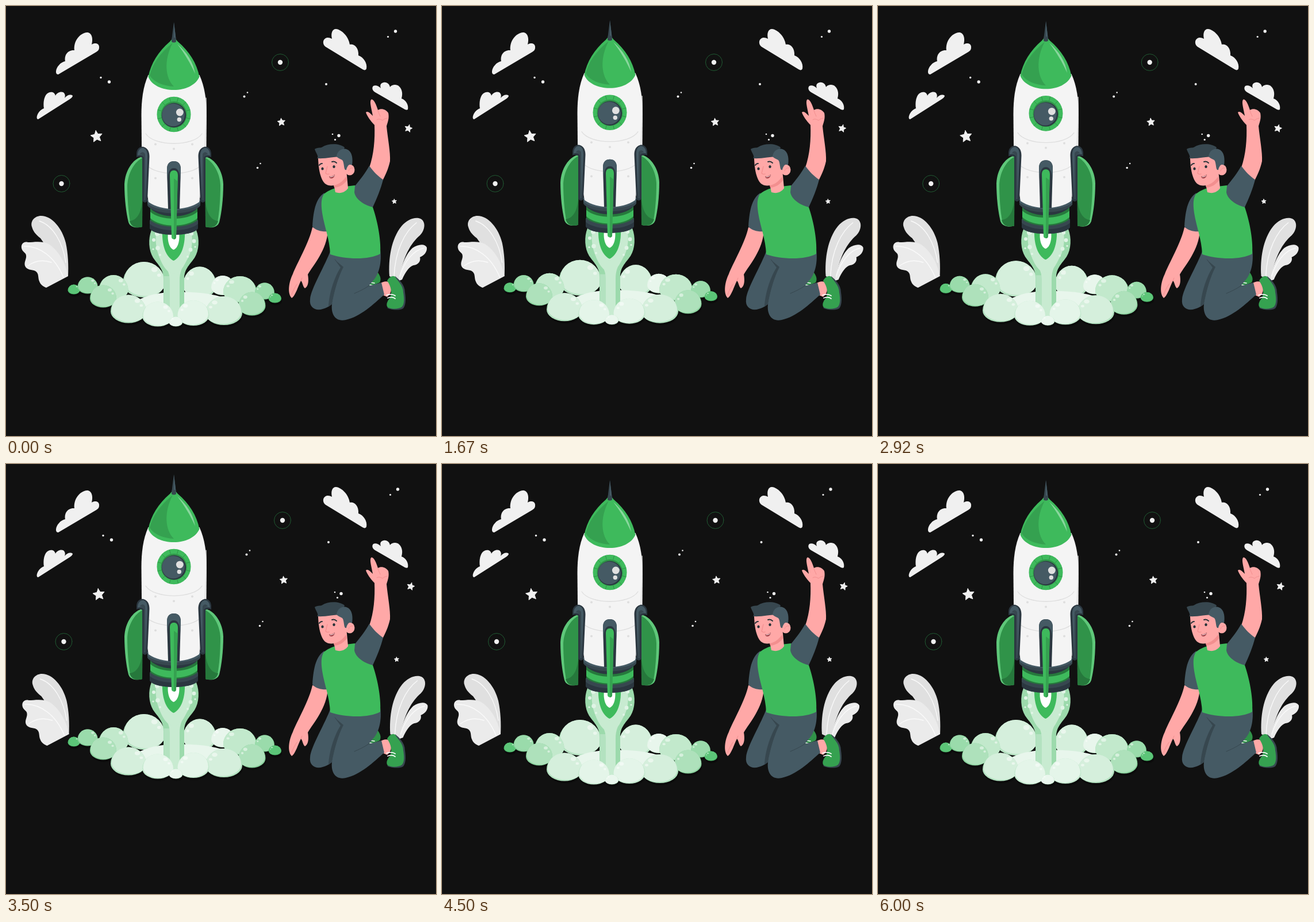
An HTML page with a canvas that plays this animation: 748x748 px, repeating every 6.04 s.

```html
<!DOCTYPE html>
<html lang="en">
<head>
<meta charset="utf-8">
<title>Rocket launch</title>
<style>
html, body { margin: 0; width: 100%; height: 100%; overflow: hidden; background: #111; }
canvas { display: block; width: 100vw; height: 100vh; }
</style>
</head>
<body>
<canvas id="stage" width="748" height="748"></canvas>
<script>
const ctx = document.getElementById('stage').getContext('2d');
const LOOP = 6040, FRAME = 1000 / 24, UNIT = 748 / 500;
const GREEN = '#3eba5c', MID = '#35a150', DEEP = '#309349', DARK = '#26783c';
const SLATE = '#455a64', NAVY = '#37474f', INK = '#2b3740';
const SKIN = '#ffa8a7', BLUSH = '#f28f8f', WHITE = '#f0f0f0';

function fill(color, d) {
  ctx.fillStyle = color;
  ctx.fill(new Path2D(d));
}

function line(color, width, d) {
  ctx.strokeStyle = color;
  ctx.lineWidth = width;
  ctx.lineCap = ctx.lineJoin = 'round';
  ctx.stroke(new Path2D(d));
}

function oval(color, x, y, rx, ry = rx) {
  ctx.fillStyle = color;
  ctx.beginPath();
  ctx.ellipse(x, y, rx, ry, 0, 0, Math.PI * 2);
  ctx.fill();
}

function group(dx, dy, draw) {
  ctx.save();
  ctx.translate(dx, dy);
  draw();
  ctx.restore();
}

// Draws the same part on both sides of the rocket axis.
function both(draw) {
  draw();
  ctx.save();
  ctx.translate(584, 0);
  ctx.scale(-1, 1);
  draw();
  ctx.restore();
}

function skyClouds() {
  fill(WHITE, 'M91,119C85,120 86,109 92,103C95,99 99,97 103,96C101,86 107,76 119,77C117,62 128,47 141,46C149,46 152,56 149,67C155,63 163,65 162,73C162,76 160,78 157,80Z');
  fill(WHITE, 'M56,197C51,197 54,183 66,178C64,164 68,151 77,150C82,149 85,152 86,156C89,149 100,147 102,153C103,155 103,157 102,160C106,155 112,153 116,156C116,158 114,160 111,162Z');
  fill(WHITE, 'M556,71C551,68 550,59 556,56C559,54 563,55 567,57C565,48 567,40 574,40C584,41 596,53 598,67C605,65 614,72 613,86C622,89 629,100 627,109C626,112 623,112 620,110Z');
  fill(WHITE, 'M642,150C637,147 636,142 639,139C643,137 648,139 652,143C650,137 652,134 657,133C663,132 667,136 668,141C671,137 679,135 684,140C690,146 690,154 688,161C695,163 701,172 699,180C698,181 696,181 694,180Z');
}

function star(x, y, r, tilt) {
  ctx.beginPath();
  for (let i = 0; i < 10; i++) {
    const a = (tilt + i * 36) * Math.PI / 180, q = i % 2 ? r * 0.48 : r;
    ctx.lineTo(x + q * Math.cos(a), y + q * Math.sin(a));
  }
  ctx.closePath();
  ctx.fillStyle = ctx.strokeStyle = WHITE;
  ctx.lineWidth = 1;
  ctx.lineJoin = 'round';
  ctx.fill();
  ctx.stroke();
}

function stars() {
  const dots = [
    [165, 124.5, 1.7], [179.5, 132, 2.7], [677.5, 44, 2.7], [664.5, 53.5, 1.6],
    [557, 136, 2], [414.5, 157.5, 2], [420, 150.5, 1.3], [437.5, 281.5, 1.8],
    [442.5, 274, 1.3], [568, 223, 1.3], [572.5, 232.5, 1.6], [579, 225.5, 2.7]
  ];
  for (const [x, y, r] of dots) oval(WHITE, x, y, r);
  for (const [x, y] of [[477, 98], [96.5, 309]]) {
    oval(WHITE, x, y, 4.2);
    ctx.strokeStyle = '#205a32';
    ctx.lineWidth = 1;
    ctx.beginPath();
    ctx.arc(x, y, 14.5, 0, Math.PI * 2);
    ctx.stroke();
  }
  star(157.5, 227, 10.6, -98);
  star(479, 202, 7, -96);
  star(700, 213, 6.8, -76);
  star(675.5, 340, 4.2, -96);
}

function plants() {
  fill('#e0e0e0', 'M45,384C42,374 50,365 61,365C80,365 98,387 104,412C108,430 109,452 108,470L95,470C85,448 72,420 60,404C50,396 47,391 45,384Z');
  line('#fafafa', 1.4, 'M58,374C82,382 99,412 104,446');
  fill('#ebebeb', 'M38,411C30,409 26,415 27,421C28,428 35,429 35,434C36,440 31,445 33,452C36,460 45,458 51,461C58,465 55,473 58,479C60,485 65,488 70,490L108,470C104,446 90,424 74,414C63,408 48,411 38,411Z');
  line('#fafafa', 1.4, 'M31,418C58,417 85,436 100,472M38,452C50,443 64,441 79,446');
  fill('#e0e0e0', 'M667,470C665,440 670,405 688,383C698,371 712,366 721,370C731,375 729,390 720,399C705,412 690,435 684,478Z');
  line('#fafafa', 1.4, 'M714,377C694,392 677,425 675,470');
  fill('#ebebeb', 'M683,478C686,455 695,432 707,421C717,414 729,413 732,420C733,428 727,434 720,437C722,444 717,450 709,451C702,453 695,462 689,476Z');
  line('#fafafa', 1.4, 'M727,421C708,425 693,445 685,470');
}

// A dome: tall above its widest line, flatter below.
function dome(x, y, rx, ry) {
  const mid = y + ry * 0.18;
  ctx.beginPath();
  ctx.ellipse(x, mid, rx, ry * 1.18, 0, Math.PI, Math.PI * 2);
  ctx.ellipse(x, mid, rx, ry * 0.82, 0, 0, Math.PI);
  ctx.closePath();
}

// A shaded smoke ball lit from the side of the jet.
function puff([x, y, rx, ry, light, dark]) {
  const side = x < 292 ? 1 : -1;
  ctx.save();
  dome(x, y, rx, ry);
  ctx.fillStyle = dark;
  ctx.fill();
  ctx.clip();
  dome(x + side * rx * 0.06, y - ry * 0.08, rx, ry);
  ctx.fillStyle = light;
  ctx.fill();
  ctx.globalAlpha = 0.5;
  oval('#fff', x + side * rx * 0.5, y - ry * 0.57, rx * 0.15, ry * 0.14);
  oval('#fff', x + side * rx * 0.72, y - ry * 0.25, rx * 0.09, ry * 0.09);
  ctx.restore();
}

const backPuffs = [
  [240, 476, 36.5, 31, '#d5efdc', '#b7e3c3'], [337, 481, 29, 27.5, '#d5efdc', '#b7e3c3'],
  [118, 493, 10.5, 8.5, '#5cc578', '#43b062'], [142, 486, 17.5, 14.5, '#9adbab', '#7bcb91'],
  [187, 490, 25.5, 22, '#c2e9cc', '#9fdcaf'], [169, 505, 23, 19.5, '#aee1bb', '#8ad29d'],
  [377, 486, 20, 17, '#e8f6ec', '#cdebd5'], [407, 493, 29, 23, '#c2e9cc', '#9fdcaf'],
  [450, 496, 17, 14.5, '#9adbab', '#7bcb91'], [468, 508, 11, 8.5, '#5cc578', '#43b062'],
  [428, 518, 23.5, 20.5, '#aee1bb', '#8ad29d']
];
const frontPuffs = [
  [213, 527, 31, 24.5, '#d5efdc', '#b2e1bf'], [379, 530, 32, 25, '#d5efdc', '#b2e1bf'],
  [264, 536, 27, 21.5, '#e4f5e9', '#c5e9cf'], [326, 534, 27.5, 22, '#e4f5e9', '#c5e9cf'],
  [295.5, 549, 11.5, 8.5, '#eaf7ee', '#c5e9cf']
];

function exhaust() {
  for (const [x, y, rx, ry] of backPuffs.concat(frontPuffs)) {
    dome(x + 1, y + 4, rx, ry);
    ctx.fillStyle = '#0b0b0b';
    ctx.fill();
  }
  backPuffs.forEach(puff);
  fill('#e8f6ec', 'M226,514C245,502 268,498 292,498C326,496 366,500 398,514L392,540H232Z');
  fill('#9cdaac', 'M253,390C247,405 248,425 256,438C266,452 274,458 274,475V546H310V475C310,458 318,452 328,438C336,425 337,405 331,390Z');
  fill('#b3e2c0', 'M274.5,470H286V546H274.5Z');
  fill('#c8ebd1', 'M262,390C258,410 263,432 270,443C277,452 285,462 285,478V546H302V478C302,462 307,453 314,443C323,430 326,410 322,390Z');
  fill('#c8ebd1', 'M268,440C276,460 285,465 292,466C299,465 306,460 314,443Z');
  const dots = [
    [257, 407, 3], [264, 421, 3.8], [268, 433, 2], [263, 396, 4], [327, 409, 3.4],
    [321, 424, 3.4], [316, 436, 2], [323, 396, 3.2], [256, 423, 1.6], [329, 419, 1.6]
  ];
  for (const [x, y, r] of dots) oval('#e0f4e6', x, y, r);
  fill(GREEN, 'M272,392C271,420 280,438 291.5,443C303,438 312,420 311,392Z');
  fill('#fff', 'M282,394C280,410 285,422 291.5,424C298,422 303,410 301,394Z');
  frontPuffs.forEach(puff);
}

function porthole() {
  oval(GREEN, 292, 188.5, 29.5, 30.8);
  for (let i = 0; i < 12; i++) {
    const a = (i + 0.5) * Math.PI / 6, c = Math.cos(a), s = Math.sin(a);
    line(DEEP, 1, `M${292 + 22 * c},${188.5 + 23 * s}L${292 + 29 * c},${188.5 + 30 * s}`);
  }
  oval(DEEP, 292, 189, 22.5, 23);
  oval(INK, 292, 190, 21.2);
  oval(SLATE, 291, 189.5, 19.8);
  oval('#e0e0e0', 302.3, 185, 6.4);
  oval('#e0e0e0', 301.3, 197.5, 3.7);
}

function rocket() {
  fill(NAVY, 'M292,28L295,52L296,63H288L289,52Z');
  fill(SLATE, 'M292,28L295,52L296,63H292Z');

  both(() => {
    fill('#5fc87a', 'M237,262C220,266 207,287 206,310C206,335 209,360 213,376C216,385 226,387 237,384Z');
    fill(DEEP, 'M238,264C224,270 212,290 211,312C211,335 213,360 216,375C219,385 228,386 237,384Z');
    fill(DARK, 'M215,374C227,373 235,361 237,340V384C227,387 218,385 215,374Z');
  });

  // Engine rings.
  fill(DARK, 'M251,345H333V382C315,392 269,392 251,382Z');
  fill(GREEN, 'M251,358C268,374 316,374 333,358V369C316,386 268,386 251,369Z');
  fill(INK, 'M252,346C272,364 312,364 332,346V353C314,370 270,370 252,353Z');
  fill(NAVY, 'M250,372C268,388 316,388 334,372V386C329,402 255,402 250,386Z');
  fill(INK, 'M250,379C268,394 316,394 334,379V386C329,402 255,402 250,386Z');
  fill(NAVY, 'M246,336H338V347C326,365 258,365 246,347Z');
  fill(SLATE, 'M246,337H338V343C325,359 259,359 246,343Z');

  fill('#f4f4f4', 'M247.5,120C238,141 235.5,165 235.5,190L236,245C238,285 243,315 248,341C270,357 314,357 336,341C341,315 346,285 348.5,245L349,190C349,165 346,141 336.5,120Z');
  line('#dedede', 1.3, 'M348,160C349,200 348,250 336,338M243,222C258,245 326,245 341,222M245,277C262,296 322,296 339,277');
  for (const [x, y] of [[260, 240.5], [324, 240.5], [292, 248.5], [260, 299.5], [324, 299.5]]) oval('#dedede', x, y, 2);

  fill(GREEN, 'M292,57C296,57 297,60 299,62C319,79 332,100 336.5,123C330,138 312,146 292,146C272,146 253,138 247.5,123C252,100 265,79 285,62C287,60 288,57 292,57Z');
  fill(MID, 'M290,64C268,82 255,100 250,121C258,133 274,139 292,140C277,125 274,95 290,64Z');
  fill('#8ad79e', 'M298,66C315,81 326,98 329,118C321,100 311,83 298,66Z');
  fill(NAVY, 'M288.5,55H295.5L296,62C294,64 290,64 288,62Z');
  porthole();

  both(() => {
    fill(INK, 'M227,263V256C228,247 234,244 239,245C247,247 249.5,254 249.5,262L246,338C245,343 239,343 237,338V264C233,262 230,262 227,263Z');
    fill(SLATE, 'M229,260C229,250 235,246 239,247C245,249 246,255 246,262L243,336C242,339 240,338 240,336V263C237,258 232,259 229,260Z');
    fill(NAVY, 'M233,258C235,253 240,253 242,258L243,336C242,339 240,338 240,336V263C238,259 235,258 233,258Z');
  });

  fill(INK, 'M280,284C280,274 285,270 292,270C299,270 304,274 304,284L302,353H282Z');
  fill(SLATE, 'M280,284C280,274 285,270 292,270C299,270 304,274 304,284L303,305C303,289 299,282 292,282C285,282 281,289 281,305Z');
  fill(GREEN, 'M285,295C285,288 288,286 292,286C296,286 299,288 299,295L296,402C296,407 288,407 288,402Z');
  fill(MID, 'M292,300L298.5,305L296,402C296,405 294,406 292,406Z');
}

function legs() {
  fill(DEEP, 'M645,461C650,468 654,474 650,481L633,488C629,482 638,474 645,461Z');
  line('#fff', 1.6, 'M634,481L641,482M632,485L638,486');
  fill(SLATE, 'M565,424C556,450 530,492 529,510C527,525 539,531 551,527C560,525 567,519 572,512L600,450Z');
  fill(NAVY, 'M571,440L588,453C578,470 571,498 567,519L561,523C562,500 571,472 582,455Z');
  fill(SKIN, 'M648,485C652,480 662,477 667,481C672,490 671,500 663,506L656,503Z');
  fill(SLATE, 'M565,424L651,424C654,445 649,466 640,476L631,487L653,481L658,502C640,518 616,541 591,546C573,550 565,536 567,519C571,495 579,470 587,454L575,444Z');
  line(NAVY, 1, 'M631,487C622,493 613,497 606,500');
  fill(NAVY, 'M677,470C684,476 694,485 694,498C696,512 695,521 691,526C685,530 668,529 663,525L680,510Z');
  fill(MID, 'M663,478C667,471 673,468 677,471C681,478 691,486 691,498C693,510 693,518 689,523C683,528 668,528 663,523C661,518 664,512 668,508C672,498 670,488 663,478Z');
  line('#fff', 1.8, 'M662,503C668,501 673,501 677,504M664,508C669,506 673,506 677,509');
}

function arms() {
  fill(SKIN, 'M533,385C528,410 505,450 499,466C492,480 489,500 497,508C503,505 508,488 513,478C516,480 516,488 520,491C526,488 527,478 525,467C535,450 558,425 560,390Z');
  line(BLUSH, 1, 'M497,502C499,495 503,489 506,484M513,478L515,473');
  fill(SLATE, 'M554,325C540,334 535,352 533,384C540,391 550,393 561,392C562,375 558,350 551,337Z');
  fill(SKIN, 'M632,281C640,258 642,232 641,207C634,200 628,191 626,185C629,182 633,186 638,191C636,179 632,167 635,163C639,160 644,171 647,181C653,177 661,180 665,186C667,195 664,202 662,209C664,230 669,255 668,270C665,284 660,294 654,306Z');
  line(BLUSH, 1, 'M645,198C648,195 653,198 655,199C658,196 661,196 663,195M647,182C648,186 650,189 651,192');
}

function shirt() {
  fill(GREEN, 'M553,327C562,320 572,316 582,315L607,312C622,330 636,343 638,350C645,370 653,405 651,431C632,442 590,441 564,432C563,405 554,385 550,360C548,345 548,335 553,327Z');
  fill(SLATE, 'M607,313C615,303 625,291 632,278C639,288 648,297 656,302C652,318 645,335 638,350C625,347 608,337 606,324Z');
}

function head() {
  fill(SKIN, 'M568,300L573,324C582,327 590,324 595,317L592,285Z');
  fill(BLUSH, 'M570,312C579,310 587,304 591,297L593,303C588,311 580,315 571,316Z');
  fill(SKIN, 'M543,262C543,282 547,302 555,309C565,317 582,311 591,297L594,255L560,250Z');
  oval(SKIN, 598, 285, 8.5, 9.5);
  line(BLUSH, 1, 'M596,287C597,283 600,281 603,282');
  fill(NAVY, 'M537,249C541,246 546,247 549,246C562,238 580,239 589,246L584,262C570,262 556,266 541,265C545,262 539,256 537,249Z');
  fill(SLATE, 'M575,262C576,252 584,247 592,249C602,252 604,265 602,277C598,274 594,277 592,285C587,287 589,273 585,268C582,266 578,265 575,262Z');
  oval('#263238', 550.5, 283, 2.2, 2.5);
  oval('#263238', 570.5, 279.5, 2.2, 2.5);
  line('#263238', 1.9, 'M545,277C546,275 548,274 550,274M567,271C570,270 573,271 575,273');
  line(BLUSH, 1.2, 'M559,279L556,291C558,293 560,293 562,292');
  fill('#a5484f', 'M562,296C566,297 569,295 572,293C572,298 567,302 563,299Z');
  line('#fff', 0.9, 'M564,297.2C567,297.2 569,296 571,295');
}

function person() {
  legs();
  arms();
  shirt();
  head();
}

const hover = t => -10 * UNIT * (1 - Math.abs(1 - 2 * (t % 1500) / 1500));

const sway = [0, -1, 2, -4, 4, -4, 4, -4, 2, -1, 0];
function shake(t, period) {
  const p = (t % period) / period * 10, i = Math.floor(p);
  return UNIT * (sway[i] + (sway[i + 1] - sway[i]) * (p - i));
}

function draw(now) {
  const step = Math.min(144, Math.floor((now % LOOP + 5) / FRAME));
  const t = step * 6000 / 144;
  ctx.fillStyle = '#111';
  ctx.fillRect(0, 0, 748, 748);
  skyClouds();
  group(shake(t, 6000), 0, stars);
  group(shake(t, 3000), 0, plants);
  group(0, hover(t), () => {
    exhaust();
    rocket();
  });
  person();
}

const start = performance.now();
function tick() {
  draw(performance.now() - start);
  requestAnimationFrame(tick);
}
tick();
</script>
</body>
</html>
```
